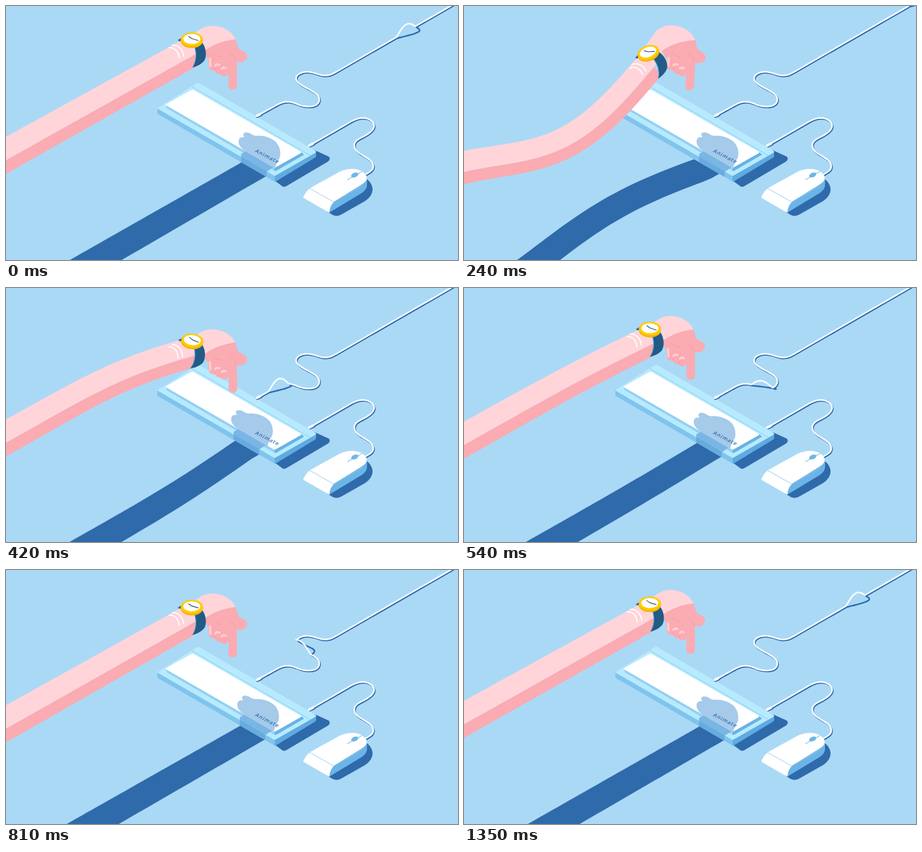
An HTML page for the animation above (1.38 s loop, 720 px wide and 405 px high).

```html
<!DOCTYPE html>
<html lang="en">
<head>
<meta charset="utf-8">
<title>Animate key</title>
<style>
  html, body { margin: 0; height: 100%; overflow: hidden; background: #aad9f6; }
  svg { display: block; width: 100vw; height: 100vh; }
  .line { fill: none; stroke-linecap: round; stroke-linejoin: round; }
  .cord { stroke: #fff; stroke-width: 2.4; }
  .cord-shade { stroke: #2f6aab; stroke-width: 2.4; }
  .shade { fill: #2f6aab; }
  .skin { fill: #ffd5da; }
  .skin-dark { fill: #fbabb2; }
  text { font: 600 8.5px "Open Sans", "Noto Sans", sans-serif; letter-spacing: 1.1px; fill: #2f6aab; }
</style>
</head>
<body>
<svg viewBox="0 0 720 405" preserveAspectRatio="none">
  <defs>
    <path id="panel" d="M256 156 L295 134 Q297 133 299 134 L469 232 Q471 234 469 235 L430 257 Q428 258 426 257 L256 159 Q253 157 256 156Z"/>
    <path id="deck" d="M243 162 L304 123 Q306 122 308 123 L493 231 Q495 232 493 234 L430 270 Q428 271 426 270 L242 164 Q240 163 243 162Z"/>
    <path id="front" d="M241 163 L428 271 V280 L243 173 Q241 172 241 170Z"/>
    <path id="mouseCord" d="M486 221 L550 184 C563 177 574 177 582 183 C590 190 586 197 578 203 C567 211 553 213 555 224 C557 238 582 240 585 254 C586 262 579 265 570 270"/>
    <clipPath id="onPanel"><use href="#panel"/></clipPath>
    <clipPath id="onDeck"><use href="#deck"/></clipPath>
    <clipPath id="onFront"><use href="#front"/></clipPath>
  </defs>

  <rect width="720" height="405" fill="#aad9f6"/>

  <!-- ground shadows -->
  <path class="shade" d="M426 277 L441 288 Q444 289 447 287 L513 248 Q518 244 514 240 L492 230Z"/>
  <path class="shade" d="M512 328 L520 333 Q527 337 535 332 L572 311 Q584 303 584 292 Q583 281 572 274Z"/>
  <path class="shade" id="armShade"/>

  <!-- cords -->
  <path id="route" fill="none" d="M402 174 L431 158 C447 149 455 153 468 158 C484 163 500 160 499 148 C498 136 470 130 463 119 C459 110 470 105 480 105 C496 106 500 113 515 110 C519 109 522 107 526 105 L724 -9"/>
  <path class="line cord-shade" id="wireShade"/>
  <path class="line cord" id="wire"/>
  <use class="line cord-shade" href="#mouseCord" x="1.200" y="1.600"/>
  <use class="line cord" href="#mouseCord"/>

  <!-- keyboard -->
  <path d="M428 270 L494 232 V239 Q494 241 492 242 L431 279 Q429 281 428 280Z" fill="#5fabe1"/>
  <use href="#front" fill="#7fc4ed"/>
  <use href="#deck" fill="#b7eafe"/>
  <path class="line" d="M296 128.500 L484 238" stroke="#8accf0"/>
  <path d="M255 158 L428 258 V263 L256 163Z" fill="#93d0f2"/>
  <path d="M428 257 L470 233 L475 237 L430 263 H428Z" fill="#68b3e5"/>
  <g clip-path="url(#onDeck)"><path class="cast" fill="#7ab6e5" d="M374.500 236 L383 231 L427 256.500 L415 264.500 V275 L374.500 249Z"/></g>
  <g clip-path="url(#onFront)"><path class="cast" fill="#67abdf" d="M374.500 236 L415 260 V276 L374.500 252Z"/></g>
  <use href="#panel" fill="#fff"/>
  <g clip-path="url(#onPanel)"><path class="cast" fill="#a5caea" d="M386 236 L381 231 C373 226 369 219 371 213 C372 209 376 209 380 209 C375 204 380 200 386 202 C391 203 393 207 399 207 C412 206 424 211 431 218 C437 225 438 235 436 242 C433 247 430 251 428 262Z"/></g>
  <text transform="matrix(.88 .45 -.64 .74 396 232.500)">Animate</text>
  <g class="line">
    <path d="M400 177 L407 174 M484 224 L491 221" stroke="#2f6aab" stroke-width="3"/>
    <path d="M400 175 L405 172.500 M483 222.500 L489 219.500" stroke="#fff" stroke-width="4"/>
  </g>

  <!-- mouse -->
  <path d="M514 330 L516 319 L523 311 L574 270 Q576 278 575 287 Q574 293 567 298Z" fill="#6cb4e7"/>
  <path d="M475 302 Q479 294 485 290 L530 265 C546 257 563 259 570 266 C578 273 575 280 566 285 L524 311 Q516 317 515 329.500 L474 306 Q473 304 475 302Z" fill="#fff"/>
  <g class="line">
    <path d="M484 291 L522 312.500 L567 287" stroke="#8fc8ee" stroke-width=".9"/>
    <path d="M544 277 L567 264" stroke="#6aaee0"/>
  </g>
  <ellipse cx="555.500" cy="269.500" rx="6" ry="3.600" transform="rotate(-24 555.500 269.500)" fill="#6fb6e8"/>

  <!-- arm -->
  <path class="skin" id="armTop"/>
  <path class="skin-dark" id="armSide"/>
  <path class="skin" id="handTop"/>
  <g id="hand">
    <path class="skin-dark" d="M313 74 C328 61 348 55 366 53 C369 62 368 67 374 70 C381 73 385 77 384 82 C382 89 375 91 368 89 V126 C368 136 354 136 354 126 L355 107 C353 113 344 113 342 109 C338 109 334 107 333 103 C327 104 323 101 323 96 L322 84Z"/>
    <g class="line">
      <path d="M325 84 L325.500 96 M333.500 95 Q336 92 340 94 M344 100 Q346 97 350 99" stroke="#ffccd1" stroke-width="3.600"/>
      <path d="M331 75 Q335 81 343 81 M333 99 V103 M343 104 V108 M357 77 Q364 79 367 88" stroke="#f597a1" stroke-width=".8"/>
    </g>
  </g>
  <g id="watch">
    <path d="M273.500 54.500 L280 50.500 L282 53 L277 56.500Z" fill="#2c6796"/>
    <path d="M300 60 L313 59 C319 67 320 80 316 87 C312 92 305 96 297 98 C303 88 304 76 300 62Z" fill="#215b86"/>
    <g class="line">
      <path d="M300.500 66 C304 77 303 88 297.500 97" stroke="#5fa6d6"/>
      <path d="M260 66.500 C269 66 275 73 276 83 M265 62.500 C274 62 282 69 283 80" stroke="#fff" stroke-width="1.800"/>
    </g>
    <path d="M278.500 53 V56 A17.500 11 0 0 0 313.500 56 V53Z" fill="#f6b500"/>
    <ellipse cx="296" cy="53" rx="17.500" ry="11" fill="#fc0"/>
    <ellipse cx="296" cy="52.500" rx="13.500" ry="8" fill="#fff"/>
    <path class="line" d="M291 48.500 L296 52 L306 55" stroke="#2b4a66" stroke-width="1.200"/>
  </g>
</svg>

<script>
const LOOP = 1380, STEP = 30;
const CAST_X = -.35, CAST_Y = -.2;   // shadow travel per pixel of drop
const PULSE = [[248, -25], [660, 121], [1050, 192], [1600, 472]];   // time, place on the cord
const PULSE_R = 17.5;

const $ = id => document.getElementById(id);
const draw = (id, d) => $(id).setAttribute("d", d);
const fix = p => p[0].toFixed(2) + " " + p[1].toFixed(2);
const poly = pts => "M" + pts.map(fix).join("L");
const band = (p, q) => poly([...p, ...[...q].reverse()]) + "Z";

const ease = (t, a, b) => {
  const u = Math.min(1, Math.max(0, (t - a) / (b - a)));
  return u * u * (3 - 2 * u);
};
// Rises from a to b, falls from c to d
const hump = (t, a, b, c, d) => ease(t, a, b) - ease(t, c, d);

function pose(t) {
  const dip = hump(t, 60, 240, 240, 420);
  const hand = 34 * hump(t, 280, 410, 430, 620)
    - 4.5 * hump(t, 560, 650, 670, 800)
    + 6 * hump(t, 680, 810, 1050, LOOP);
  return {
    hand,
    wrist: .9 * hand + 21 * dip,
    tail: 14 * dip + 8 * hump(t, 430, 640, 700, 1300),
    bend: 52 * dip - 14 * hump(t, 330, 420, 420, 600)
  };
}

// How far the arm hangs below its rest line, q = 0 at the elbow, 1 at the wrist
function drop({ tail, wrist, bend }, q) {
  q = Math.min(q, 1);
  return tail + (wrist - tail) * q + bend * Math.sin(Math.PI * q ** 1.3);
}

// Edge beside a curve at distance d (positive is below), narrowing along the way
function edge(curve, d, end = 1) {
  const pts = [], n = 40, e = .004;
  for (let i = 0; i <= n; i++) {
    const q = end * i / n;
    const [x, y] = curve(q), [x0, y0] = curve(Math.max(0, q - e)), [x1, y1] = curve(Math.min(end, q + e));
    const k = d * (1 - .08 * q) / Math.hypot(x1 - x0, y1 - y0);
    pts.push([x - (y1 - y0) * k, y + (x1 - x0) * k]);
  }
  return pts;
}

function drawArm(p) {
  const curve = q => {
    const x = -20 + 322 * q;
    return [x, 246 - .56 * x + drop(p, q)];
  };
  const top = edge(curve, -33), mid = edge(curve, 0), low = edge(curve, 19);
  draw("armTop", band(top, mid));
  draw("armSide", band(mid, low));

  const turn = .06 * p.bend, dx = .02 * p.bend, r = turn * Math.PI / 180;
  const at = (x, y) => fix([
    345 + dx + (x - 345) * Math.cos(r) - (y - 80) * Math.sin(r),
    80 + p.hand + (x - 345) * Math.sin(r) + (y - 80) * Math.cos(r)
  ]);
  draw("handTop", `M${fix(top.at(-1))} L${at(303, 42)}
    C${at(310, 35)} ${at(319, 31.5)} ${at(329, 31.5)}
    C${at(347, 32)} ${at(363, 42)} ${at(367, 57)}
    L${at(340, 64)} ${at(318, 76)} ${fix(mid.at(-1))}Z`);
  $("hand").setAttribute("transform", `translate(${dx} ${p.hand}) rotate(${turn} 345 80)`);
  $("watch").setAttribute("transform",
    `translate(${-.06 * p.bend} ${p.wrist}) rotate(${-.385 * p.bend} 296 52)`);
}

function drawShade(p) {
  const curve = q => {
    const x = -20 + 322 * q, d = drop(p, q);
    return [x + 88 + CAST_X * d, 436.8 - .575 * x + CAST_Y * d];
  };
  draw("armShade", band(edge(curve, -21, 1.12), edge(curve, 21, 1.12)));
  for (const el of document.querySelectorAll(".cast"))
    el.setAttribute("transform", `translate(${CAST_X * p.hand} ${CAST_Y * p.hand})`);
}

const route = $("route"), cord = [];
for (let s = 0; s < route.getTotalLength(); s += 2) {
  const p = route.getPointAtLength(s);
  cord.push([p.x, p.y, s]);
}

function pulseAt(t) {
  if (t < PULSE[0][0]) t += LOOP;
  const i = Math.max(1, PULSE.findIndex(k => t <= k[0]));
  const [t0, s0] = PULSE[i - 1], [t1, s1] = PULSE[i];
  return s0 + (s1 - s0) * (t - t0) / (t1 - t0);
}

function drawCord(t) {
  const mid = t > LOOP ? pulseAt(t - LOOP) : pulseAt(t);
  const lift = s => {
    const u = (s - mid) / PULSE_R;
    return Math.abs(u) < 1 ? Math.cos(u * Math.PI / 2) * Math.min(1, s / 15) : 0;
  };
  draw("wire", poly(cord.map(([x, y, s]) => [x, y - 11.5 * lift(s)])));
  draw("wireShade", poly(cord.map(([x, y, s]) => [x + 1.2 + 18 * lift(s), y + 1.6 - lift(s)])));
}

function frame() {
  const t = Math.floor(performance.now() / STEP) * STEP % LOOP;
  const p = pose(t);
  drawCord(t);
  drawShade(p);
  drawArm(p);
  requestAnimationFrame(frame);
}
frame();
</script>
</body>
</html>
```
